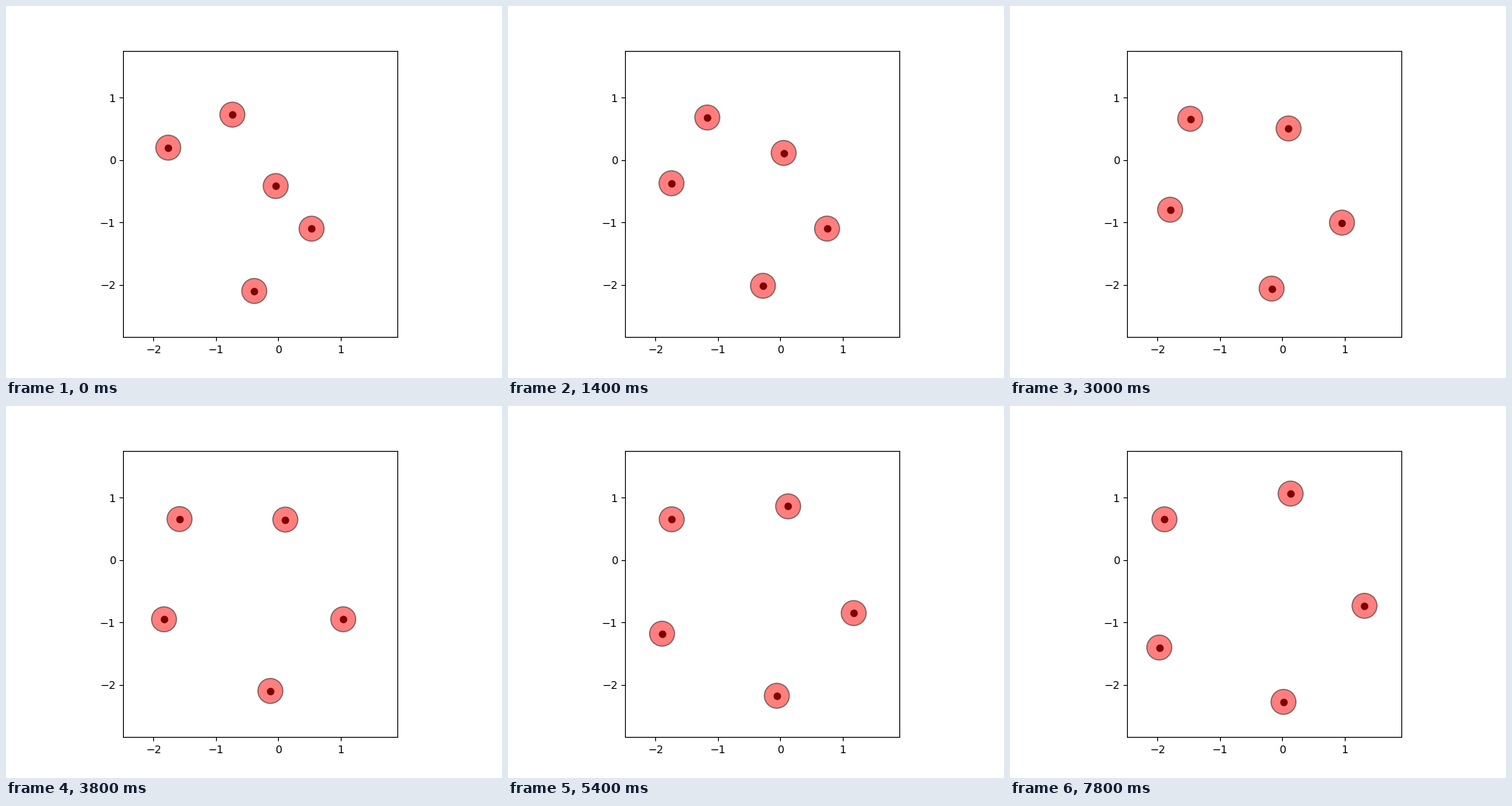
Animation, 640 px wide and 480 px high, one loop 8 s. Source, as a matplotlib script:

```python
import numpy as np
import matplotlib.pyplot as plt
from matplotlib.animation import FuncAnimation
from matplotlib.patches import Circle

FRAMES, INTERVAL = 40, 200
RADIUS = 0.2

# The five nodes: where they begin, where they end, how their paths bend
START = np.array([(-0.735, 0.728), (-1.762, 0.199), (-0.041, -0.416),
                  (0.534, -1.099), (-0.384, -2.097)])
END = np.array([(-1.887, 0.653), (-1.970, -1.401), (0.134, 1.065),
                (1.318, -0.733), (0.020, -2.272)])
BEND = np.array([(-0.070, -0.082), (0.410, 0.042), (0.139, -0.030),
                 (-0.296, -0.569), (-0.171, 0.633)])


def spread(i):
    """Share of the way travelled, slowing down like a relaxing system."""
    return 1 - (1 + i / 60) ** -3


def positions(i):
    s = spread(i) / spread(FRAMES - 1)
    return START + (END - START) * s + BEND * s * (1 - s)


fig, ax = plt.subplots(figsize=(6.4, 4.8), dpi=100)
ax.set_aspect("equal")
ax.set_xlim(-2.4845, 1.9059)
ax.set_ylim(-2.8359, 1.7532)
ax.set_xticks(range(-2, 2))
ax.set_yticks(range(-2, 2))

# Black dots show maroon through the translucent discs
dots, = ax.plot([], [], "o", color="black", markersize=6, zorder=2)
discs = [ax.add_patch(Circle(p, RADIUS, facecolor="red", edgecolor="black",
                             linewidth=1, alpha=0.5, zorder=3))
         for p in START]


def update(i):
    points = positions(i)
    dots.set_data(*points.T)
    for disc, p in zip(discs, points):
        disc.center = p
    return [dots, *discs]


anim = FuncAnimation(fig, update, frames=FRAMES, interval=INTERVAL,
                     repeat=True, repeat_delay=0)
plt.show()
```
